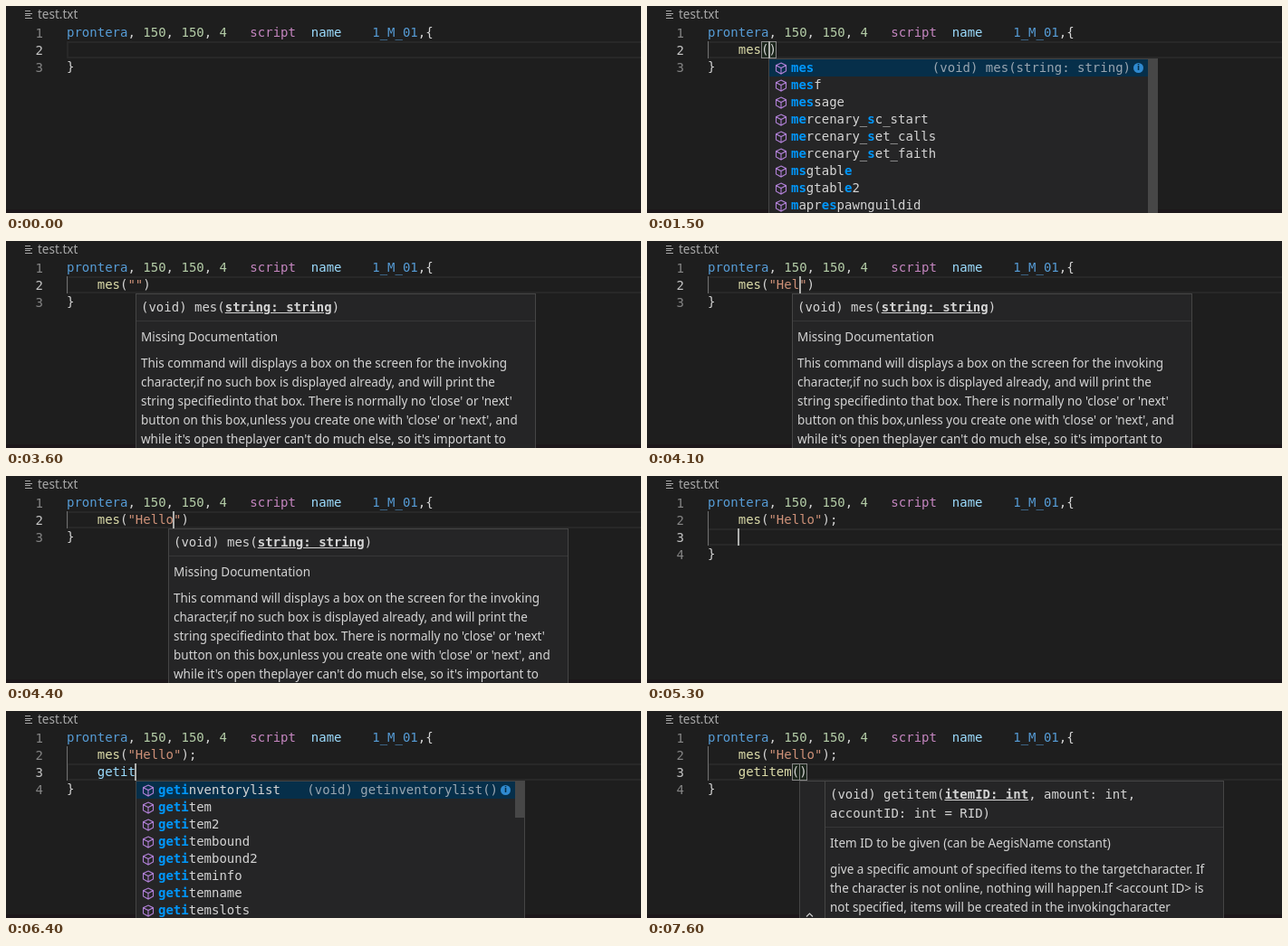
Recreate the animation shown at these times as an HTML page. Size 701 px wide and 229 px high, loop 8000 ms.

```html
<!DOCTYPE html>
<html lang="en">
<head>
<meta charset="utf-8">
<title>Script editor</title>
<style>
html, body { margin: 0; width: 100%; height: 100%; overflow: hidden; background: #1e1e1e; }
#stage { position: relative; width: 701px; height: 229px; overflow: hidden; background: #1e1e1e;
  color: #d4d4d4; font: 14px/19px "DejaVu Sans Mono", monospace; white-space: pre; }
#stage div, #stage svg { position: absolute; box-sizing: border-box; }
.ui { font: 13.5px/21px "Noto Sans", "Open Sans", sans-serif; color: #d4d4d4; }
#stage .tab { left: 35px; top: -1px; color: #a9a9a9; }
.strip { left: 0; top: 225px; width: 701px; height: 4px; background: #1c171a; }
.num { left: 32.6px; color: #858585; }
.num.on { color: #c6c6c6; }
.hl { left: 67px; width: 640px; height: 19px; border: 2px solid #282828; }
.guide { left: 67px; top: 39px; width: 1px; background: #707070; }
.caret { width: 2px; height: 19px; background: #aeafad; }
.match { width: 9px; height: 19px; border: 1px solid #888; background: rgba(0, 100, 0, .1); }
.pop { height: 250px; background: #252526; border: 1px solid #454545; overflow: hidden; }
.row { left: 0; width: 100%; height: 19px; padding-left: 24px; }
.row.sel { background: #062f4a; }
.row b { color: #0097fb; }
.row svg { left: 6px; top: 3px; }
.detail { right: 29px; top: 0; color: #99a5b0; }
.info { right: 15px; top: 4px; width: 11px; height: 11px; border-radius: 50%; background: #2f8ad0;
  color: #062f4a; font: bold 9px/11px "DejaVu Sans", sans-serif; text-align: center; }
.thumb { right: 0; top: 0; width: 10px; background: #474747; }
.sig { top: 4px; line-height: 21px; }
.sig b { text-decoration: underline; }
.rule { height: 1px; right: 0; background: #373738; }
.side { left: 27px; top: 0; width: 1px; height: 250px; background: #454545; }
.c1 { color: #569cd6 } .c2 { color: #b5cea8 } .c3 { color: #c586c0 }
.c4 { color: #9cdcfe } .c5 { color: #dcdcaa } .c6 { color: #ce9178 }
</style>
</head>
<body>
<div id="stage"></div>
<script>
const stage = document.getElementById('stage');
const CW = 8.4287, LEFT = 67, LINE = 19, TOP = 20, LOOP = 8000;
const colX = col => LEFT + (col + 4) * CW;
const div = (cls, style, body = '') => `<div class="${cls}" style="${style}">${body}</div>`;

const HEADER = '<span class="c1">prontera</span>, <span class="c2">150</span>, <span class="c2">150</span>, ' +
  '<span class="c2">4</span>   <span class="c3">script</span>  <span class="c4">name</span>    ' +
  '<span class="c1">1_M_01</span>,{';

// Odd segments between bars are the matched letters
const MES = ['|mes', '|mes|f', '|mes|sage', '|me|rcenary_|s|c_start', '|me|rcenary_|s|et_calls',
  '|me|rcenary_|s|et_faith', '|ms|gtabl|e', '|ms|gtabl|e|2', '|m|apr|es|pawnguildid'];
const ITEMS = ['nventorylist', 'tem', 'tem2', 'tembound', 'tembound2', 'teminfo', 'temname', 'temslots']
  .map(s => 'geti' + s);
const startingWith = p => ITEMS.filter(s => s.startsWith(p)).map(s => `|${p}|${s.slice(p.length)}`);

const list = (items, detail, thumb) => ({ w: 430, items, detail, thumb });
const mesList = list(MES, '(void) mes(string: string)', 230);
const getList = list(startingWith('geti'), '(void) getinventorylist()', 40);
const itemDetail = '(void) getitem(itemID: i…';
const itList = list(startingWith('getit'), itemDetail, 60);
const itemList = list(startingWith('getitem'), itemDetail, 60);

const mesHint = { w: 442, pad: 0, lines: 1,
  sig: '(void) mes(<b>string: string</b>)',
  title: 'Missing Documentation',
  text: `This command will displays a box on the screen for the invoking
character,if no such box is displayed already, and will print the
string specifiedinto that box. There is normally no 'close' or 'next'
button on this box,unless you create one with 'close' or 'next', and
while it's open theplayer can't do much else, so it's important to` };
const itemHint = { w: 469, pad: 28, lines: 2,
  sig: '(void) getitem(<b>itemID: int</b>, amount: int,\naccountID: int = RID)',
  title: 'Item ID to be given (can be AegisName constant)',
  text: `give a specific amount of specified items to the targetcharacter. If
the character is not online, nothing will happen.If &lt;account ID&gt; is
not specified, items will be created in the invokingcharacter` };

// time, text of line 2, caret offset from line end, popup, popup lag in px
const HELLO = 'mes("Hello")', DONE = HELLO + ';';
const first = [
  [0, '', 0], [800, 'm', 0], [900, 'me', 0, mesList], [1000, 'mes', 0, mesList],
  [1500, 'mes()', 1, mesList], [1600, 'mes()', 1, mesHint],
  [2000, 'mes("")', 2, mesHint, 9], [2100, 'mes("")', 2, mesHint, 4], [2200, 'mes("")', 2, mesHint],
  [3900, 'mes("H")', 2, mesHint, 8], [4000, 'mes("He")', 2, mesHint, 8],
  [4100, 'mes("Hel")', 2, mesHint, 8], [4200, 'mes("Hell")', 2, mesHint, 8],
  [4300, 'mes("Hell")', 2, mesHint, 4], [4400, HELLO, 2, mesHint, 6], [4500, HELLO, 2, mesHint],
  [4800, HELLO, 1, mesHint, 4], [4900, HELLO, 0], [5100, DONE, 0]
].map(([t, ...s]) => ({ t, row: 1, s }));
// the same for line 3
const second = [
  [5200, '', 0], [5800, 'g', 0], [5900, 'ge', 0, getList], [6000, 'get', 0, getList],
  [6100, 'geti', 0, getList, 8], [6200, 'geti', 0, getList], [6400, 'getit', 0, getList],
  [6500, 'getite', 0, itList], [6600, 'getitem', 0, itemList],
  [7100, 'getitem()', 1, itemList], [7200, 'getitem()', 1, itemHint]
].map(([t, ...s]) => ({ t, row: 2, s }));
const steps = [...first, ...second];
const caretOff = [[0, 400], [2600, 3100], [3600, 3900], [7600, LOOP]];

const paint = s => s.replace(/"[^"]*"|\w+(?=\()|\w+/g, w =>
  `<span class="${w[0] === '"' ? 'c6' : s.includes(w + '(') ? 'c5' : 'c4'}">${w}</span>`);

const CUBE = '<svg width="14" height="14" fill="none" stroke="#b180d7" stroke-width="1.1">' +
  '<path d="M7 1L12.5 3.7V10L7 13L1.5 10V3.7ZM1.5 3.7L7 6.6L12.5 3.7M7 6.6V13"/></svg>';
const FILE = '<svg width="40" height="20" stroke="#a9a9a9" style="left:0;top:0">' +
  '<path d="M21 5.5h6M21 8.5h8M21 10.5h6M21 13.5h8"/></svg>';

function listBody({ items, detail, thumb }) {
  const rows = items.map((item, i) => {
    const label = item.split('|').map((s, k) => k % 2 ? `<b>${s}</b>` : s).join('');
    const extra = i ? '' : div('detail', '', detail) + div('info', '', 'i');
    return div(i ? 'row' : 'row sel', `top:${i * LINE}px`, CUBE + label + extra);
  });
  return rows.join('') + div('thumb', `height:${thumb}px`);
}

function hintBody({ pad, lines, sig, title, text }) {
  const y = 8 + lines * 21, x = `left:${pad + 5}px;`;
  const side = pad ? div('side', '') +
    '<svg width="9" height="6" fill="none" stroke="#ccc" stroke-width="1.2" style="left:6px;top:145px">' +
    '<path d="M1 4.5L4.5 1L8 4.5"/></svg>' : '';
  return side + div('sig', x, sig) + div('rule', `left:${pad}px;top:${y}px`) +
    div('ui', `${x}top:${y + 8}px`, title) + div('ui', `${x}top:${y + 37}px`, text);
}

function draw({ row, s: [text, back, pop, lag = 0] }, caretOn) {
  const y = TOP + row * LINE, col = text.length - back;
  const lines = row === 1 ? [text] : [DONE, text];
  let out = FILE + div('ui tab', '', 'test.txt') + div('strip', '') + div('hl', `top:${y}px`);
  if (row > 1 || text) out += div('guide', `height:${row * LINE}px`);
  for (let i = 0; i < row + 2; i++)
    out += div(i === row ? 'num on' : 'num', `top:${TOP + 1 + i * LINE}px`, i + 1);
  if (text.includes(')') && /[()]/.test(text.slice(Math.max(col - 1, 0), col + 1)))
    for (const c of '()')
      out += div('match', `left:${Math.round(colX(text.indexOf(c)))}px;top:${y}px`);
  const code = (i, html, x = LEFT) => div('', `left:${x}px;top:${TOP + i * LINE}px`, html);
  out += code(0, HEADER) + code(row + 1, '}');
  lines.forEach((s, i) => out += code(i + 1, paint(s), colX(0)));
  if (caretOn) out += div('caret', `left:${Math.floor(colX(col) - .1)}px;top:${y}px`);
  if (pop) out += div('pop',
    `left:${Math.round(colX(col)) - lag}px;top:${y + LINE}px;width:${pop.w}px`,
    pop.items ? listBody(pop) : hintBody(pop));
  return out;
}

let shown = '';
function frame() {
  const t = performance.now() % LOOP;
  const step = steps.findLast(s => s.t <= t);
  const caretOn = !caretOff.some(([a, b]) => t >= a && t < b);
  const key = step.t + ' ' + caretOn;
  if (key !== shown) {
    shown = key;
    stage.innerHTML = draw(step, caretOn);
  }
  requestAnimationFrame(frame);
}
frame();
</script>
</body>
</html>
```
